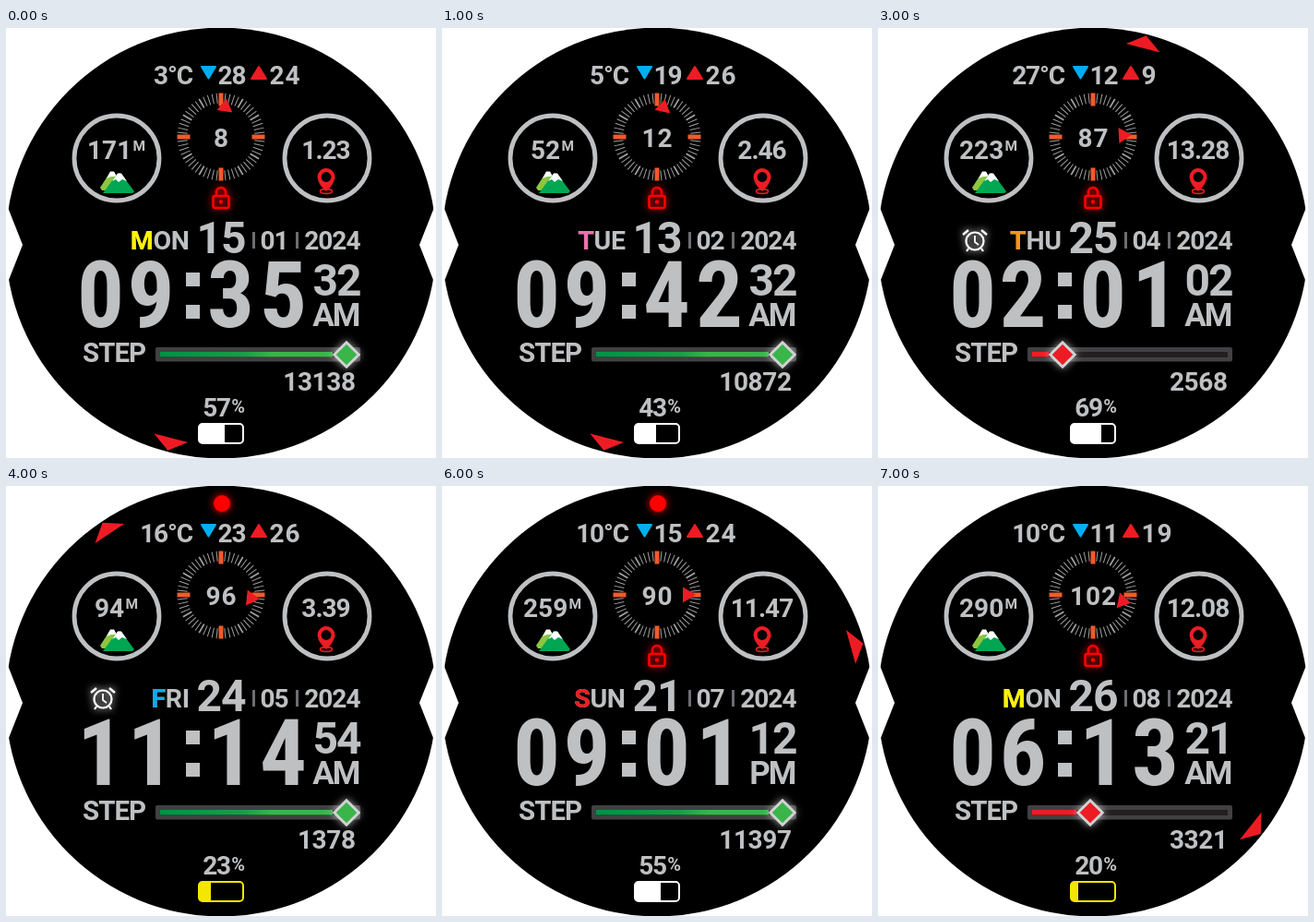
These frames come from a looping animation (466x466 px, 8000 ms). An HTML page with a canvas:

```html
<!DOCTYPE html>
<html lang="en">
<head>
<meta charset="utf-8">
<title>Watch face</title>
<style>
html, body { margin: 0; width: 100%; height: 100%; overflow: hidden; background: #fff; }
canvas { display: block; width: 466px; height: 466px; }
</style>
</head>
<body>
<canvas id="face" width="466" height="466"></canvas>
<script>
const ctx = document.getElementById('face').getContext('2d');
const GREY = '#bfc0c2', RED = '#ed1c24', ORANGE = '#f15a29';
const DAY_COLORS = { MON: '#fff200', TUE: '#f06eaa', WED: '#00a651', THU: '#f7941d',
  FRI: '#00aeef', SAT: '#92278f', SUN: '#ed1c24' };
const BODY_FONT = 'Roboto, sans-serif';
const CLOCK_FONT = '"Roboto Condensed", "Open Sans Condensed", "Open Sans", sans-serif';
const STEP_MS = 1000;

const states = [
  { temp: 3, low: 28, high: 24, heading: 8, alt: 171, km: '1.23', lock: 1, day: 'MON', date: '15', month: '01',
    time: '0935', sec: '32', half: 'AM', steps: 13138, knob: 369, power: 57 },
  { temp: 5, low: 19, high: 26, heading: 12, alt: 52, km: '2.46', lock: 1, day: 'TUE', date: '13', month: '02',
    time: '0942', sec: '32', half: 'AM', steps: 10872, knob: 369, power: 43 },
  { temp: 8, low: 21, high: 28, heading: 7, alt: 1, km: '3.88', day: 'WED', date: '20', month: '03',
    time: '0702', sec: '47', half: 'PM', steps: 4956, knob: 289.5, power: 25 },
  { temp: 27, low: 12, high: 9, heading: 87, alt: 223, km: '13.28', lock: 1, alarm: 1, day: 'THU', date: '25', month: '04',
    time: '0201', sec: '02', half: 'AM', steps: 2568, knob: 200, power: 69 },
  { temp: 16, low: 23, high: 26, heading: 96, alt: 94, km: '3.39', alarm: 1, radio: 1, day: 'FRI', date: '24', month: '05',
    time: '1114', sec: '54', half: 'AM', steps: 1378, knob: 369, power: 23 },
  { temp: 13, low: 17, high: 25, heading: 93, alt: 146, km: '8.26', lock: 1, day: 'SAT', date: '15', month: '06',
    time: '0847', sec: '04', half: 'PM', steps: 10246, knob: 369, power: 62 },
  { temp: 10, low: 15, high: 24, heading: 90, alt: 259, km: '11.47', lock: 1, radio: 1, day: 'SUN', date: '21', month: '07',
    time: '0901', sec: '12', half: 'PM', steps: 11397, knob: 369, power: 55 },
  { temp: 10, low: 11, high: 19, heading: 102, alt: 290, km: '12.08', lock: 1, day: 'MON', date: '26', month: '08',
    time: '0613', sec: '21', half: 'AM', steps: 3321, knob: 230, power: 20 }
];

function text(str, x, y, size, align = 'left', { spacing = 0, color = GREY, font = BODY_FONT, width = '' } = {}) {
  ctx.font = `bold ${width} ${size}px ${font}`;
  ctx.letterSpacing = spacing + 'px';
  ctx.textAlign = 'left';
  ctx.fillStyle = color;
  const w = ctx.measureText(str).width - spacing;
  ctx.fillText(str, align === 'right' ? x - w : align === 'center' ? x - w / 2 : x, y);
  return w;
}

function trace(points, close = true) {
  ctx.beginPath();
  points.forEach(([x, y], i) => i ? ctx.lineTo(x, y) : ctx.moveTo(x, y));
  if (close) ctx.closePath();
}

function fillShape(color, ...points) {
  trace(points);
  ctx.fillStyle = color;
  ctx.fill();
}

function strokeLine(color, width, ...points) {
  trace(points, false);
  ctx.strokeStyle = color;
  ctx.lineWidth = width;
  ctx.stroke();
}

// A triangle with softened corners.
function softTriangle(color, ...points) {
  fillShape(color, ...points);
  ctx.strokeStyle = color;
  ctx.lineWidth = 2;
  ctx.lineJoin = 'round';
  ctx.stroke();
  ctx.lineJoin = 'miter';
}

function circle(x, y, r, color, width) {
  ctx.beginPath();
  ctx.arc(x, y, r, 0, Math.PI * 2);
  ctx.strokeStyle = ctx.fillStyle = color;
  ctx.lineWidth = width || 1;
  width ? ctx.stroke() : ctx.fill();
}

function box(x, y, w, h, r, color) {
  ctx.beginPath();
  ctx.roundRect(x, y, w, h, r);
  ctx.fillStyle = color;
  ctx.fill();
}

function at(x, y, degrees, draw, glow) {
  ctx.save();
  ctx.translate(x, y);
  ctx.rotate(degrees * Math.PI / 180);
  if (glow) { ctx.shadowColor = glow; ctx.shadowBlur = 8; }
  draw();
  ctx.restore();
}

function drawCase() {
  ctx.fillStyle = '#fff';
  ctx.fillRect(0, 0, 466, 466);
  circle(233, 233, 233.4, '#000');
  fillShape('#fff', [0, 190], [3, 197], [18, 235], [3, 273], [0, 280]);
  fillShape('#fff', [466, 190], [463, 197], [448, 235], [463, 273], [466, 280]);
}

function drawWeather(s) {
  text(s.temp + '°C', 203, 61, 28, 'right', { spacing: -1.2 });
  softTriangle('#00aeef', [212, 42], [227, 42], [219.5, 54.5]);
  text(String(s.low), 229.5, 61, 28, 'left', { spacing: -1 });
  softTriangle(RED, [266, 55], [282, 55], [274, 42]);
  text(String(s.high), 285.5, 61, 28, 'left', { spacing: 1 });
}

function drawCompass(s) {
  for (let i = 0; i < 60; i++) {
    const main = i % 15 === 0, mid = i % 5 === 0;
    at(233, 118, i * 6, () =>
      strokeLine(main ? ORANGE : '#a0a1a3', main ? 5 : mid ? 1.8 : 1, [0, -47.5], [0, main ? -33.5 : -36.5]));
  }
  at(233, 118, s.heading, () => fillShape(RED, [-8.5, -28], [8.5, -28], [0, -42]));
  text(String(s.heading), 233, 129, 28, 'center', { spacing: 1 });
}

function drawDials(s) {
  circle(120, 141, 46, GREY, 4.8);
  circle(348, 141, 46, GREY, 4.8);

  const digits = String(s.alt), w = digits.length * 16 + 15;
  text(digits, 119.5 - w / 2, 142, 28, 'left', { spacing: 0 });
  text('M', 119.5 + w / 2, 133, 15.5, 'right');
  text(s.km, 347, 142, 28, 'center', { spacing: -1 });

  fillShape('#8dc63f', [102, 173], [113, 156], [117, 156], [128, 174], [124, 176], [104, 176]);
  fillShape('#fff', [109, 163], [113, 155.5], [117, 155.5], [120, 161], [114, 161]);
  fillShape('#00a651', [105, 179], [119, 160], [123, 157], [127, 161], [139, 177], [137, 179]);
  fillShape('#fff', [115, 166], [121, 157.5], [125, 157.5], [131, 166], [126, 164], [122, 167], [119, 164]);

  ctx.beginPath();
  ctx.ellipse(347, 177, 6.5, 2.4, 0, 0, Math.PI * 2);
  ctx.strokeStyle = RED;
  ctx.lineWidth = 1.6;
  ctx.stroke();
  ctx.beginPath();
  ctx.arc(347, 161.5, 9.5, Math.PI * 0.85, Math.PI * 0.15);
  ctx.quadraticCurveTo(353, 172, 347, 177);
  ctx.quadraticCurveTo(341, 172, 338.5, 166);
  ctx.fillStyle = RED;
  ctx.fill();
  circle(347, 161.5, 5.4, '#000');
}

function drawLock() {
  at(233, 184, 0, () => {
    ctx.strokeStyle = '#f00';
    ctx.lineWidth = 2.6;
    ctx.beginPath();
    ctx.roundRect(-8.5, -2, 17, 13, 2);
    ctx.moveTo(-5, -2);
    ctx.lineTo(-5, -6);
    ctx.arc(0, -6, 5, Math.PI, 0);
    ctx.lineTo(5, -2);
    ctx.stroke();
    circle(0, 4.5, 2.2, '#f00');
  }, '#f00');
}

// Plain stand-in for the wireless badge.
function drawRadio() {
  at(234, 19, 0, () => circle(0, 0, 9, '#f00'), '#f00');
}

function drawAlarm() {
  at(105, 231, 0, () => {
    circle(0, 0, 9.5, '#fff', 2.2);
    for (const side of [-1, 1]) {
      strokeLine('#fff', 2.4, [side * 7, -12], [side * 13, -7]);
      strokeLine('#fff', 2.2, [side * 7, 8], [side * 9, 11]);
    }
    strokeLine('#fff', 1.8, [0, -6], [0, 1], [4, 4]);
  }, '#fff');
}

function drawDate(s) {
  const left = 199 - text(s.day, 199, 240, 28.5, 'right', { spacing: -0.3 });
  text(s.day[0], left, 240, 28.5, 'left', { color: DAY_COLORS[s.day] });
  text(s.date, 233.5, 243.5, 48, 'center', { spacing: -1 });
  box(267, 221, 3, 18, 0, '#6d6e71');
  text(s.month, 291, 240, 28, 'center', { spacing: -1 });
  box(314, 221, 3, 18, 0, '#6d6e71');
  text('2024', 384.5, 240, 28, 'right', { spacing: -1 });
}

function drawTime(s) {
  [102.5, 157, 243.5, 300.5].forEach((x, i) =>
    text(s.time[i], x, 324, 101, 'center', { font: CLOCK_FONT, width: 'condensed' }));
  box(195, 265, 15, 15, 0, GREY);
  box(195, 300, 15, 15, 0, GREY);
  text(s.sec, 359, 290, 48, 'center', { spacing: -2 });
  text(s.half, 384.5, 323, 35, 'right', { spacing: -2 });
}

function drawSteps(s) {
  text('STEP', 83, 362, 29.5, 'left', { spacing: -1 });
  box(162, 346, 222, 15.5, 2, '#414042');
  box(167, 351, 212, 6, 0, '#231f20');

  const full = s.knob > 300, middle = s.knob > 250;
  const fill = full ? '#39b54a' : middle ? '#fbb040' : RED;
  const ramp = ctx.createLinearGradient(167, 0, s.knob, 0);
  ramp.addColorStop(0, full ? '#009245' : RED);
  ramp.addColorStop(0.45, full ? '#1c9c47' : RED);
  ramp.addColorStop(0.6, fill);
  ramp.addColorStop(1, fill);
  box(167, 351, s.knob - 182, 5.5, 0, ramp);

  at(s.knob, 354, 45, () => box(-10.8, -10.8, 21.6, 21.6, 0, '#d1d3d4'), 'rgba(255,255,255,.65)');
  at(s.knob, 354, 45, () => box(-8, -8, 16, 16, 0, fill));
  text(String(s.steps), 379, 393, 28, 'right', { spacing: -0.4 });
}

function drawBattery(s) {
  const color = s.power > 30 ? '#fff' : '#f5e600';
  text(String(s.power), 244, 421, 28, 'right', { spacing: -1.5 });
  text('%', 259, 417, 20, 'right');
  ctx.beginPath();
  ctx.roundRect(209, 429, 48, 21, 4);
  ctx.strokeStyle = color;
  ctx.lineWidth = 2;
  ctx.stroke();
  box(209, 429, 5 * Math.ceil(s.power / 10) - 2, 21, [4, 0, 0, 4], color);
}

function drawSecondMarker(s) {
  at(233, 233, s.sec * 6 + 2.4, () => fillShape(RED, [-19, -218], [19, -218], [0, -232]));
}

function render(now) {
  const s = states[Math.floor(now / STEP_MS) % states.length];
  drawCase();
  drawWeather(s);
  drawCompass(s);
  drawDials(s);
  if (s.lock) drawLock();
  if (s.radio) drawRadio();
  if (s.alarm) drawAlarm();
  drawDate(s);
  drawTime(s);
  drawSteps(s);
  drawBattery(s);
  drawSecondMarker(s);
}

const start = performance.now();
function tick() {
  render(performance.now() - start);
  requestAnimationFrame(tick);
}
tick();
</script>
</body>
</html>
```
